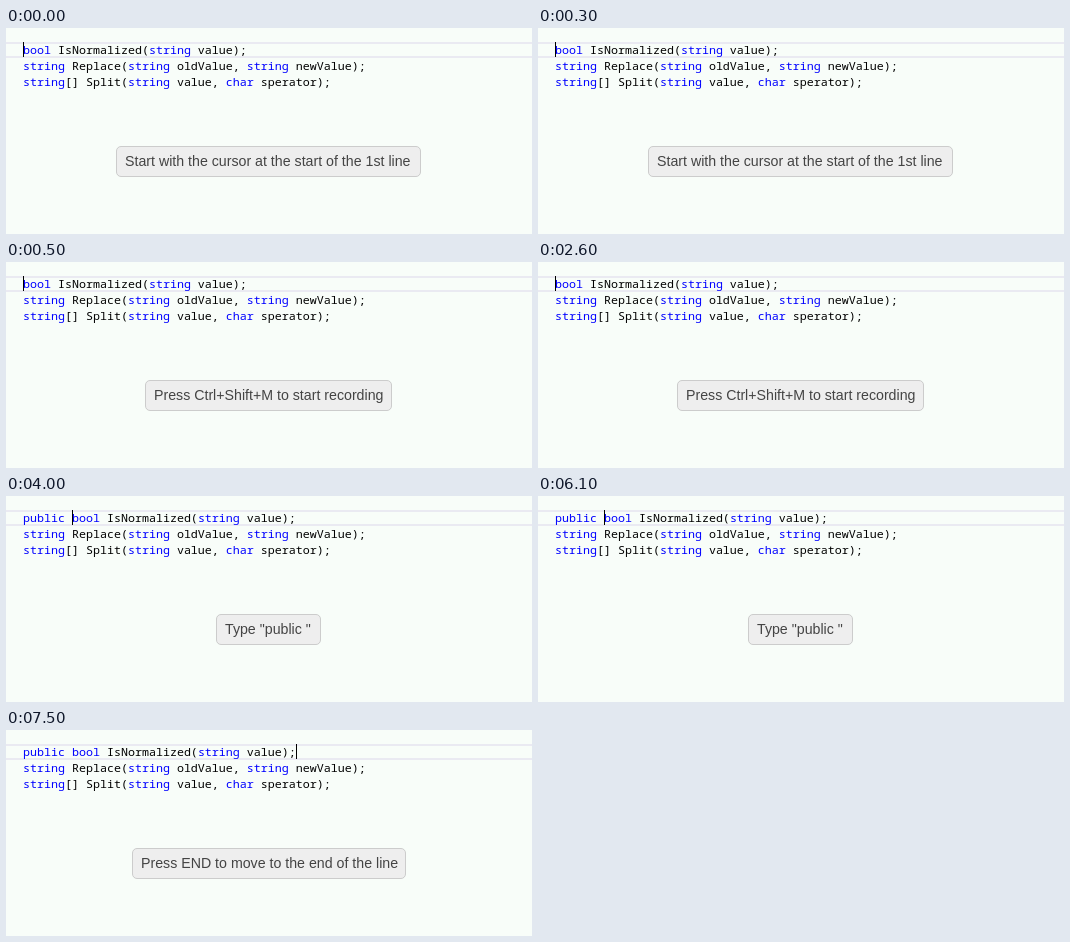
Animation, 526 px wide and 206 px high, one loop 8 s. Source, as an HTML page:

```html
<!DOCTYPE html>
<html lang="en">
<head>
<meta charset="utf-8">
<title>Recording a macro</title>
<style>
  html, body { margin: 0; width: 100%; height: 100%; overflow: hidden; background: #f8fdf9; }
  svg { display: block; }
  .code { font: 500 11.667px "Noto Sans Mono", "DejaVu Sans Mono", monospace; white-space: pre; fill: #000; }
  .key { fill: #00f; }
  .tip { font: 14.2px "Liberation Sans", Arial, sans-serif; white-space: pre; fill: #444; }
</style>
</head>
<body>
<svg width="526" height="206" viewBox="0 0 526 206">
  <rect width="526" height="206" fill="#f8fdf9"/>
  <path d="M0 15H526M0 29H526" stroke="#eaeaf2" stroke-width="2"/>
  <g id="code" class="code"></g>
  <rect id="caret" y="14" width="1" height="15" fill="#000" shape-rendering="crispEdges"/>
  <rect id="box" y="118.5" height="30" rx="4.5" fill="#eee" stroke="#ccc"/>
  <text id="tip" class="tip" y="138"></text>
</svg>
<script>
const LOOP = 8000, LEFT = 17, CHAR = 7, PADDING = 9, PREFIX = "public ";
const SIGNATURES = [
  "bool IsNormalized(string value);",
  "string Replace(string oldValue, string newValue);",
  "string[] Split(string value, char sperator);"
];
const STEPS = [
  { at: 0, tip: "Start with the cursor at the start of the 1st line", x: 110, w: 305, typed: 0, caret: 0 },
  { at: 500, tip: "Press Ctrl+Shift+M to start recording", x: 139, w: 247, typed: 0, caret: 0 },
  { at: 4000, tip: 'Type "public "', x: 210, w: 105, typed: 7, caret: 7 },
  { at: 7500, tip: "Press END to move to the end of the line", x: 126, w: 274, typed: 7, caret: 39 }
];
const $ = id => document.getElementById(id);

function highlight(line) {
  return line.replace(/\b(public|bool|string|char)\b/g, '<tspan class="key">$1</tspan>');
}

function show(step) {
  $("code").innerHTML = SIGNATURES.map((line, i) => {
    const text = i ? line : PREFIX.slice(0, step.typed) + line;
    return `<text x="${LEFT}" y="${26 + i * 16}">${highlight(text)}</text>`;
  }).join("");
  $("caret").setAttribute("x", LEFT + step.caret * CHAR);
  $("box").setAttribute("x", step.x + 0.5);
  $("box").setAttribute("width", step.w - 1);
  $("tip").setAttribute("x", step.x + PADDING);
  $("tip").textContent = step.tip;
}

let current;
function render(time) {
  const t = time % LOOP;
  const step = STEPS.findLast(s => s.at <= t);
  if (step !== current) show(current = step);
}

const start = performance.now();
function tick() {
  render(performance.now() - start);
  requestAnimationFrame(tick);
}
tick();
</script>
</body>
</html>
```
